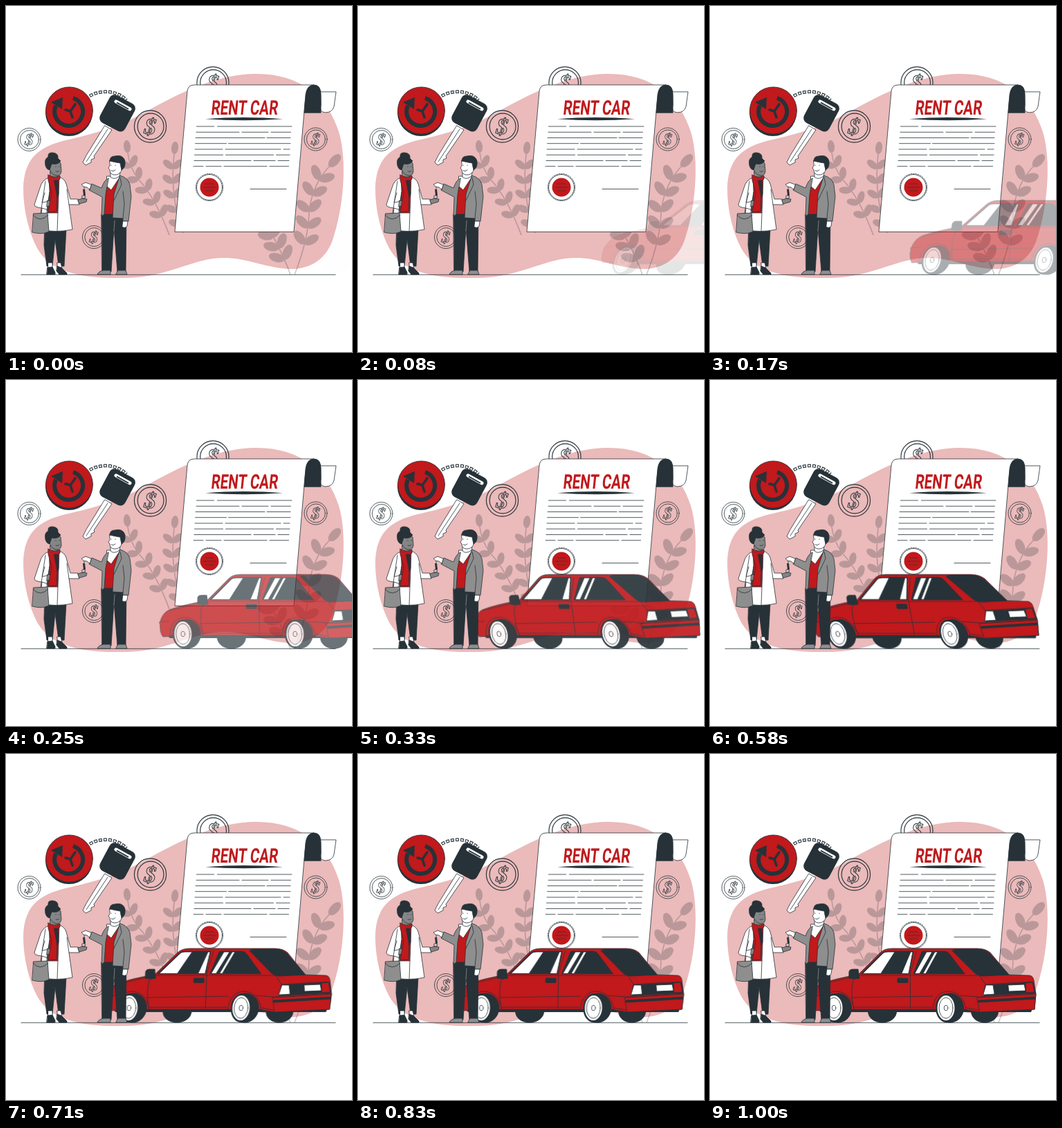
Recreate the animation shown at these times as an HTML page. Size 500x500 px, loop 1.04 s.

```html
<!DOCTYPE html>
<html lang="en">
<head>
<meta charset="utf-8">
<title>Rent a car</title>
<style>
  html, body { margin: 0; width: 100%; height: 100%; overflow: hidden; background: #fff; }
  svg { display: block; width: 100vw; height: 100vh; }
  :root { --red: #c1191c; --dark: #263238; --skin: #858585; --gray: #8e8e8e; }
  .ink { stroke: var(--dark); stroke-width: .8; stroke-linejoin: round; stroke-linecap: round; }
  .line { fill: none; }
  .red { fill: var(--red); }
  .dark { fill: var(--dark); }
  .white { fill: #fff; }
  .gray { fill: var(--gray); }
  .skin { fill: var(--skin); }
  .plants { opacity: .25; fill: var(--dark); }
  .plants path { fill: none; stroke: var(--dark); stroke-width: 1.6; }
  .coin text { font: italic bold 24px "Liberation Serif", serif; text-anchor: middle; stroke-width: .7; }
  .title { font: bold 29px Roboto, sans-serif; text-anchor: middle; }

  .car {
    transform-origin: 309px 334px;
    animation: arrive 1040ms infinite cubic-bezier(.36, -.01, .5, 1.38);
  }
  @keyframes arrive {
    0% {
      transform: translateX(243.7px) skewX(-19.7deg); opacity: .009;
      animation-timing-function: cubic-bezier(.34, .12, .5, 1.364);
    }
    54.5% { transform: translateX(0) skewX(10deg); opacity: 1; }
    73.8% { transform: translateX(0) skewX(-2deg); opacity: 1; }
    93%, 100% { transform: translateX(0) skewX(0deg); opacity: 1; }
  }
</style>
</head>
<body>
<svg viewBox="0 0 500 500" xmlns="http://www.w3.org/2000/svg">
  <defs>
    <g id="coin" class="coin ink line">
      <circle r="16.5"/>
      <circle r="13.5" cx=".4"/>
      <text y="8" transform="rotate(6)">$</text>
    </g>
  </defs>

  <path fill="#ebbaba" d="M25 264C26 222 45 204 86 194C130 184 162 175 200 154C250 126 305 98 362 98C425 98 465 131 481 182C493 222 489 290 471 341C459 371 432 384 398 379C362 374 337 360 299 365C259 371 226 393 170 393C111 394 65 386 45 350C33 327 25 295 25 264Z"/>
  <g id="plants" class="plants"></g>

  <use href="#coin" x="33.5" y="193"/>
  <use href="#coin" x="447.5" y="192.5"/>
  <use href="#coin" x="127" y="334"/>
  <use href="#coin" transform="translate(208.500 174) scale(1.4)"/>
  <use href="#coin" transform="translate(299 111) scale(1.4)"/>

  <path class="ink line" d="M22 388.300H476"/>

  <!-- contract -->
  <g class="ink">
    <path class="white" d="M455 124H477L474 145Q472 154 461 154Q452 153 455 143Z"/>
    <path class="white" d="M244 326L262 123Q263 114 272 114H445Q434 117 432 140L416 326Z"/>
    <path class="dark" d="M431 154L433 128Q435 114 445 114Q455 114 455 128V154Z"/>
    <path class="dark" stroke="none" d="M288 163.200Q344 159 400 163.200Q344 167.500 288 163.200Z"/>
    <g class="line">
      <path stroke-dasharray="25 5 108" d="M275.500 174H413"/>
      <path stroke-dasharray="62 4 38 4 40" d="M275 182.300H411.500"/>
      <path stroke-dasharray="100 3 40" d="M274 190.500H411"/>
      <path stroke-dasharray="45 3 100" d="M273.500 198.700H411"/>
      <path stroke-dasharray="40 4 80 4 40" d="M273 207H410"/>
      <path stroke-dasharray="41 4 69 4 40" d="M272.500 215.200H410"/>
      <path stroke-dasharray="82 4 31 4 40" d="M272 223.500H409"/>
      <path stroke-dasharray="14 4 22 4 62 4 40" d="M271 231.700H408.500"/>
      <path d="M353 264.500H405"/>
    </g>
    <circle class="white" cx="294" cy="262" r="18.500"/>
    <circle class="line" cx="294" cy="262" r="19.600" stroke-dasharray="2 1.5"/>
    <circle class="red" cx="294" cy="262" r="13.500" stroke="none"/>
    <path class="line" d="M288 257H300M285 262H303M288 267H300" stroke-width=".6"/>
  </g>
  <text class="title red" transform="translate(344 157) skewX(-6) scale(.71 1)">RENT CAR</text>

  <!-- key and fob -->
  <circle class="dark" cx="91" cy="154" r="34"/>
  <circle class="red ink" cx="91.500" cy="151" r="34"/>
  <g fill="none" stroke="var(--dark)">
    <path stroke-width="6" d="M72 144A20.500 20.500 0 1 0 97 133"/>
    <path stroke-width="3.500" stroke-linecap="round" d="M100 142L93 152L96 161M93 152L86 150"/>
    <path stroke-width="4.500" stroke-dasharray="5 2" d="M121 130C136 121 160 121 174 136"/>
    <path stroke="#fff" stroke-width="2.200" stroke-dasharray="3 4" stroke-dashoffset="-1" d="M121 130C136 121 160 121 174 136"/>
  </g>
  <path class="dark" d="M65 139L82 132L81 149Z"/>
  <path class="white ink" d="M143 173L153 179L127 217L128 220L123 222L123 226L115 230L111 226L116 216Z"/>
  <path class="ink line" d="M147 178L116 225"/>
  <rect class="dark" x="-20.500" y="-21.500" width="41" height="45" rx="8" transform="translate(161.500 154) rotate(28)"/>
  <path fill="none" stroke="#fff" stroke-width="5" stroke-linecap="round" d="M159 138L179 149"/>
  <path class="line" stroke="var(--dark)" stroke-width="2" d="M160 139.500L177 149"/>

  <!-- car -->
  <g class="car">
    <g class="dark">
      <ellipse cx="249" cy="372" rx="21" ry="16.500"/>
      <ellipse cx="397" cy="372" rx="20" ry="16.500"/>
      <path d="M150 362H468L464 373H160Z"/>
    </g>
    <g class="ink">
      <path class="red" d="M146 350Q150 336 160 332Q182 324 214 319L246 287Q252 281 263 281H386Q398 281 405 287L432 319L462 320Q467 321 468 327L471 347L469 369L390 373L366 369H205L150 371Q145 364 146 350Z"/>
      <path class="dark" d="M218 317.500L248 288Q251 285 257 285H294L288 317.500Z"/>
      <path class="white" d="M221 317L250 288Q252 286 257 286H267L247 317Z"/>
      <path class="white" d="M277 317L290 286H293L287 317Z"/>
      <path class="dark" d="M294 317.500L306 286Q307 285 310 285H338Q343 285 346 289L368 317.500Z"/>
      <path class="white" d="M296 317L313 286H321L303 317ZM308 317L325 286H329L312 317Z"/>
      <path class="dark" d="M350 284Q353 282 358 282H385Q397 282 404 288L432 319L394 321Q385 320 380 314Z"/>
      <path class="line" d="M214 319L206 329Q203 347 208 368M289.500 318V368M298 285L289.500 318M160 333Q190 326 214 320H390L432 319M148 349H160M204 352L322 350M362 349L388 351L471 346M206 366H320M366 366L388 370M390 321L398 333L466 329"/>
      <rect class="dark" x="271" y="324" width="15" height="6.500" rx="1"/>
      <path class="dark" d="M201 314Q202 311 206 311H214L216 324Q208 326 201 324Z"/>
      <path class="dark" d="M398 334L467 330L470 345L396 349Z"/>
      <path class="white" d="M399 334H409L411 347L395 348Z"/>
      <path class="white" d="M431 334L454 333L456 342L432 343Z"/>
      <path class="red" d="M456 331L466 330L469 344L457 345Z"/>
      <path class="red" d="M386 352L471 347L469 369L390 373Z"/>
      <path class="dark" d="M388 356L470 351V354L388 359Z"/>
    </g>
    <g id="wheels"></g>
  </g>

  <!-- woman -->
  <g class="ink">
    <path class="dark" d="M56 322H87L84 376H76L71 337L67 376H59L55 346Z"/>
    <path class="white" d="M61 371H67V379H61ZM74 371H79L81 379H75Z"/>
    <path class="dark" d="M60 378L67 377L71 385V388H59ZM74 376L80 378L88 386V388H77L73 383Z"/>
    <path class="red" d="M61 248H79L80 300H61Z"/>
    <path class="white" d="M62 248Q52 251 49 263L41 287Q41 291 52 292L49 323Q72 328 96 323L91 287L106 287L104 279L93 279L87 257Q85 250 77 247L75 299H59L63 269Z"/>
    <path class="line" d="M52 292L62 295M56 270L52 284L63 282M75 299L74 325M88 265L91 287M63 269L59 296"/>
    <path class="skin" d="M60 281L66 282L65 289L59 290ZM104 280L111 278L117 279L116 283L106 286Z"/>
    <path class="skin" d="M64 239H75V249H64Z"/>
    <path class="skin" d="M62 226Q71 219 79 227L80 239Q79 246 72 245Q64 243 62 232Z"/>
    <path class="dark" d="M57 230Q55 221 61 218Q60 211 68 212Q76 213 75 220L79 224Q75 230 66 228L63 237Q58 236 57 230Z"/>
    <path class="line" d="M72 232V232.500M77 232V232.500M72 239Q75 241 77 238"/>
    <path class="red" d="M61 244Q70 250 78 245L78 250Q75 254 70 254L74 270L73 297L61 298L66 269L61 252Z"/>
    <path class="dark" d="M70 252L75 252L76 272L74 276Z"/>
    <path class="line" d="M57 253L50 300"/>
    <path class="gray" d="M40 300L60 299L62 326Q52 331 38 327Z"/>
    <path class="line" d="M39 302Q49 314 61 302"/>
  </g>

  <!-- man -->
  <g class="ink">
    <path class="dark" d="M138 301H174L173 384H161L156 321L152 384H139Z"/>
    <path class="line" stroke="#8e8e8e" d="M157 310L156 325"/>
    <path class="gray" d="M140 382H151V388H132Q133 384 140 382ZM162 382H173L175 388H159Z"/>
    <path class="white" d="M146 246H165L155 268L145 264Z"/>
    <path class="red" d="M144 259L152 266L164 248L158 301H141Z"/>
    <path class="gray" d="M165 245Q176 248 179 258L181 275L177 311H169V307L154 306L156 272L163 250Z"/>
    <path class="gray" d="M148 249Q142 251 138 263L124 257L120 266L139 276L138 304L142 301L144 272Z"/>
    <path class="line" d="M169 268L171 286L169 307M165 248L167 258L156 281"/>
    <path class="white" d="M169 311H176L175 318Q172 322 168 319Z"/>
    <path class="white" d="M123 258L115 255L109 258L112 261L117 262L121 265Z"/>
    <path class="white" d="M151 238V247Q156 252 164 246L166 235Z"/>
    <path class="white" d="M150 223L167 222L168 235Q165 245 156 244Q150 243 150 237L148 234L150 231Z"/>
    <path class="dark" d="M150 224Q150 217 157 217Q169 214 172 224Q173 234 167 237L165 227Q158 226 150 224Z"/>
    <path class="line" d="M152 230V230.500M158 230V230.500M152 238Q155 240 158 237M166 232Q170 231 167 237"/>
  </g>
  <path class="ink line" d="M113 262V268"/>
  <path class="dark" d="M111 265H114L115 274H112Z"/>
  <circle class="ink line" cx="112" cy="276" r="2.500"/>
</svg>

<script>
  const NS = "http://www.w3.org/2000/svg";

  function add(parent, tag, attrs) {
    const el = document.createElementNS(NS, tag);
    for (const key in attrs) el.setAttribute(key, attrs[key]);
    return parent.appendChild(el);
  }

  // Leaf pairs along a stem, with a single leaf at the tip.
  function plant(d, pairs, first, size) {
    const box = document.getElementById("plants");
    const stem = add(box, "path", { d });
    const length = stem.getTotalLength();
    const leaf = (p, angle) => add(box, "ellipse", {
      cx: size, rx: size, ry: size * .56,
      transform: `translate(${p.x} ${p.y}) rotate(${angle})`
    });
    for (let i = 0; i <= pairs; i++) {
      const at = length * (first + (1 - first) * i / pairs);
      const p = stem.getPointAtLength(at);
      const q = stem.getPointAtLength(at - 2);
      const angle = Math.atan2(p.y - q.y, p.x - q.x) * 180 / Math.PI;
      const turns = i < pairs ? [-52, 46] : [0];
      turns.forEach(turn => leaf(p, angle + turn));
    }
  }

  plant("M236 331Q216 277 191 250Q178 232 176 212", 5, .22, 9);
  plant("M256 328Q236 275 243 214", 5, .1, 9);
  plant("M417 388Q438 335 438 295Q444 256 467 232", 5, .28, 11.5);
  plant("M411 388Q401 360 378 318", 3, .3, 11.5);

  function wheel(x) {
    const box = document.getElementById("wheels");
    const oval = (cx, rx, ry, cls) => add(box, "ellipse", { cx, cy: 367, rx, ry, class: cls });
    add(box, "path", {
      class: "red ink",
      d: `M${x - 20} 369Q${x - 18} 343 ${x + 3} 343Q${x + 25} 345 ${x + 28} 369Z`
    });
    oval(x + 5, 20, 21.5, "dark");
    oval(x, 16, 21, "dark");
    oval(x - 1, 12.5, 18, "white");
    oval(x - 1, 10, 15, "white ink");
    oval(x - 1, 2.8, 3.8, "white ink");
  }

  [180, 342].forEach(wheel);
</script>
</body>
</html>
```
